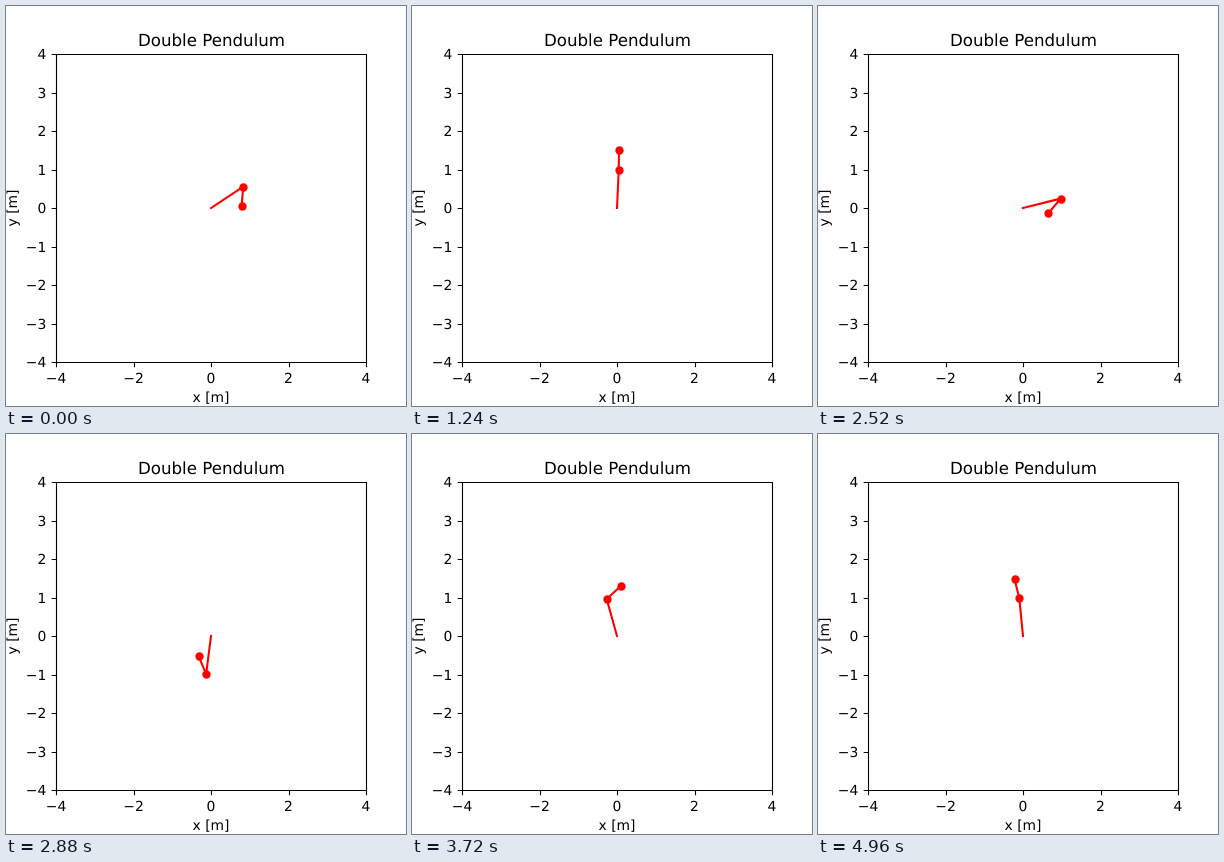
An HTML page that plays this animation: 400 px wide and 400 px high, repeating every 5 s.

```html
<!DOCTYPE html>
<html lang="en">
<head>
<meta charset="utf-8">
<title>Double Pendulum</title>
<style>
html, body { margin: 0; width: 100%; height: 100%; overflow: hidden; background: #fff; }
svg { display: block; width: 100vw; height: 100vh; }
text { font: 13.89px "DejaVu Sans", sans-serif; text-rendering: geometricPrecision; }
#title { font-size: 16.67px; }
#axes { fill: none; stroke: #000; stroke-width: 1.11; }
#rods { fill: none; stroke: #f00; stroke-width: 2.08; stroke-linecap: square; stroke-linejoin: round; }
circle { fill: #f00; }
</style>
</head>
<body>
<svg viewBox="0 0 400 400">
  <path id="axes"/>
  <g id="labels">
    <text id="title" x="205.5" y="39.5" text-anchor="middle">Double Pendulum</text>
    <text x="205" y="396" text-anchor="middle">x [m]</text>
    <text transform="translate(11 202) rotate(-90)" text-anchor="middle">y [m]</text>
  </g>
  <path id="rods"/>
  <circle id="joint" r="4.17"/>
  <circle id="tip" r="4.17"/>
</svg>
<script>
const $ = id => document.getElementById(id);
const LOOP = 5000, STEP = 40;
const L1 = 1, L2 = 0.5;
const FIRST = -0.44, GAP = 3.3; // seconds: first pass through the bottom, time between passes
const px = x => 205 + 38.75 * x;
const py = y => 202 - 38.5 * y;

// Inner rod: one full turn from upright to upright, hanging down at s = 0.
const turn = s => 4 * Math.atan(Math.exp(3.14 * s));

// Outer rod: whips almost once around by s = 0, then swings back.
const whip = s => 4 * Math.atan(2.14 / Math.hypot(Math.sinh(3.5 * s), 0.2));

// Both angles run clockwise from upright; passes alternate in direction.
function pose(t) {
  let a1 = 0, a2 = 0;
  for (let n = 0; n < 3; n++) {
    const side = n % 2 ? 1 : -1, s = t - FIRST - n * GAP;
    a1 += side * turn(s);
    a2 += side * whip(s);
  }
  return [a1, a2];
}

function place(dot, x, y) {
  dot.setAttribute("cx", Math.round(x) + 0.5);
  dot.setAttribute("cy", Math.round(y) + 0.5);
}

function draw(ms) {
  const [a1, a2] = pose(Math.floor((ms % LOOP) / STEP) * STEP / 1000);
  const x1 = px(L1 * Math.sin(a1)), y1 = py(L1 * Math.cos(a1));
  const x2 = px(L1 * Math.sin(a1) + L2 * Math.sin(a2));
  const y2 = py(L1 * Math.cos(a1) + L2 * Math.cos(a2));
  $("rods").setAttribute("d", `M205 202L${x1} ${y1}L${x2} ${y2}`);
  place($("joint"), x1, y1);
  place($("tip"), x2, y2);
}

function label(value, x, y, anchor) {
  const el = document.createElementNS("http://www.w3.org/2000/svg", "text");
  el.setAttribute("x", x);
  el.setAttribute("y", y);
  el.setAttribute("text-anchor", anchor);
  el.textContent = String(value).replace("-", "\u2212");
  $("labels").append(el);
}

function buildAxes() {
  const snap = v => Math.floor(v + 0.5) + 0.5;
  let d = "M50.5 48.5H360.5V356.5H50.5Z";
  for (let v = -4; v <= 4; v++) {
    d += `M50.5 ${snap(py(v))}h-4.86`;
    label(v, 40.3, py(v) + 5, "end");
    if (v % 2 === 0) {
      d += `M${snap(px(v))} 356.5v4.86`;
      label(v, px(v), 377, "middle");
    }
  }
  $("axes").setAttribute("d", d);
}

buildAxes();
draw(0);
const start = performance.now();
function tick() {
  draw(performance.now() - start);
  requestAnimationFrame(tick);
}
requestAnimationFrame(tick);
</script>
</body>
</html>
```
